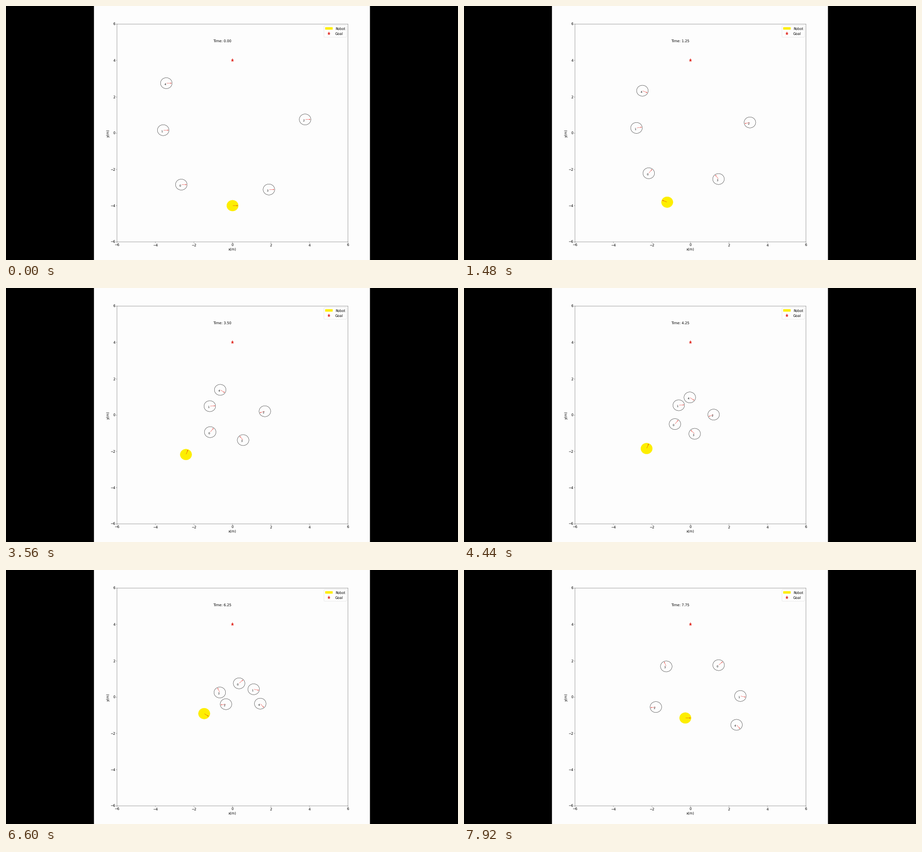
A matplotlib script for the animation above (8 s loop, 998x561 px).

```python
import numpy as np
import matplotlib.pyplot as plt
from matplotlib.animation import FuncAnimation
from matplotlib.patches import ArrowStyle, Circle, FancyArrowPatch, Rectangle

W, H, DPI = 998, 561, 100
U = 0.346                     # one point of the plot, scaled to the stage
FRAME_MS, FRAMES, TICK_MS = 40, 200, 256
DT, RADIUS, STEPS = 0.25, 0.3, 31
LEFT, RIGHT, TOP, BOTTOM = 245.1, 755.2, 40.2, 521.1
PAPER, YELLOW, RED = "#fdfdfd", "#fdee00", "#e02018"

plt.rcParams.update({
    "font.family": "DejaVu Sans", "text.hinting": "none",
    "axes.linewidth": 0.8 * U, "patch.linewidth": U, "axes.labelpad": 4 * U,
})
for axis in ("xtick", "ytick"):
    plt.rcParams.update({
        f"{axis}.major.size": 3.5 * U, f"{axis}.major.width": 0.8 * U,
        f"{axis}.major.pad": 3.5 * U, f"{axis}.labelsize": 16 * U,
    })

# Robot legs: (steps, speed, heading in sixteenths of a turn)
LEGS = [(3, 1, 8), (2, 1, 7), (6, 1, 6), (2, 1, 5), (4, 0.478, 3),
        (5, 1, 3), (5, 0.53, -1.5), (1, 1, -1), (3, 1, 0)]

# Humans: start, approach, crossing and end
KEY_TIMES = np.array([0, 3.5, 5.5, 7.75])
HUMANS = [
    [(-2.66, -2.84), (-1.16, -0.94), (-0.16, 0.27), (1.46, 1.76)],
    [(-3.60, 0.16), (-1.18, 0.49), (0.40, 0.55), (2.59, 0.06)],
    [(3.77, 0.75), (1.68, 0.21), (0.32, -0.28), (-1.80, -0.55)],
    [(1.89, -3.11), (0.55, -1.38), (-0.35, -0.36), (-1.26, 1.69)],
    [(-3.44, 2.75), (-0.64, 1.39), (0.93, 0.18), (2.39, -1.53)],
]


def human_path(points):
    """Cubic Hermite path with a slow start, sampled at every step."""
    p = np.array(points)
    m = np.gradient(p, KEY_TIMES, axis=0)
    m[0] *= 0.85
    t = np.arange(STEPS + 1) * DT
    k = np.clip(np.searchsorted(KEY_TIMES, t, side="right") - 1,
                0, len(KEY_TIMES) - 2)
    h = (KEY_TIMES[k + 1] - KEY_TIMES[k])[:, None]
    s = (t - KEY_TIMES[k])[:, None] / h
    return ((1 + 2 * s) * (1 - s) ** 2 * p[k] + s * (1 - s) ** 2 * h * m[k]
            + s * s * (3 - 2 * s) * p[k + 1] + s * s * (s - 1) * h * m[k + 1])


def robot_path(start):
    steps, speed, turn = np.array(LEGS).T
    a = turn * np.pi / 8
    moves = (speed * DT * np.array([np.cos(a), np.sin(a)])).T
    moves = np.repeat(moves, steps.astype(int), axis=0)
    return start + np.vstack([[0, 0], np.cumsum(moves, axis=0)])


def headings(path):
    dx, dy = np.diff(path, axis=0).T
    return np.concatenate([[0], np.arctan2(dy, dx)])


paths = [robot_path((0, -4))] + [human_path(p) for p in HUMANS]
angles = [headings(p) for p in paths]

fig = plt.figure(figsize=(W / DPI, H / DPI), dpi=DPI, facecolor="black")
fig.add_artist(Rectangle((194.2 / W, 0), 609.4 / W, 1, fc=PAPER, lw=0,
                         snap=False, transform=fig.transFigure, zorder=-1))
ax = fig.add_axes([LEFT / W, 1 - BOTTOM / H,
                   (RIGHT - LEFT) / W, (BOTTOM - TOP) / H], facecolor="none")
ax.set(xlim=(-6, 6), ylim=(-6, 6),
       xticks=range(-6, 7, 2), yticks=range(-6, 7, 2))
ax.set_xlabel("x(m)", fontsize=16 * U)
ax.set_ylabel("y(m)", fontsize=16 * U)

robot = Circle(paths[0][0], RADIUS, fc=YELLOW, ec=YELLOW, lw=U)
humans = [Circle(p[0], RADIUS, fill=False, ec="black", lw=1.1 * U)
          for p in paths[1:]]
bodies = [robot] + humans
for body in bodies:
    ax.add_patch(body)

goal, = ax.plot([0], [4], ls="none", marker="*", color=RED,
                ms=15 * U, mew=U)
ax.legend([robot, goal], ["Robot", "Goal"], fontsize=16 * U,
          loc="upper right", numpoints=1, borderaxespad=0.4, facecolor=PAPER)

head = ArrowStyle("->", head_length=4, head_width=2)
arrows = [FancyArrowPatch((0, 0), (1, 0), arrowstyle=head, color=RED,
                          mutation_scale=U, shrinkA=2 * U, shrinkB=2 * U,
                          lw=1.1 * U) for _ in bodies]
for arrow in arrows:
    ax.add_patch(arrow)
labels = [ax.text(0, 0, str(i), fontsize=12 * U) for i in range(len(humans))]
clock = ax.text(-1.01, 5, "", fontsize=16 * U)


def update(frame):
    step = min(int((frame * FRAME_MS + 28) / TICK_MS), STEPS)
    for body, arrow, path, angle in zip(bodies, arrows, paths, angles):
        pos, a = path[step], angle[step]
        body.center = tuple(pos)
        arrow.set_positions(pos, pos + RADIUS * np.array([np.cos(a), np.sin(a)]))
    for label, path in zip(labels, paths[1:]):
        label.set_position(path[step] - 0.11)
    clock.set_text(f"Time: {step * DT:.2f}")
    return [*bodies, *arrows, *labels, clock]


anim = FuncAnimation(fig, update, frames=FRAMES, interval=FRAME_MS,
                     init_func=lambda: update(0), repeat=True, repeat_delay=0)
plt.show()
```
